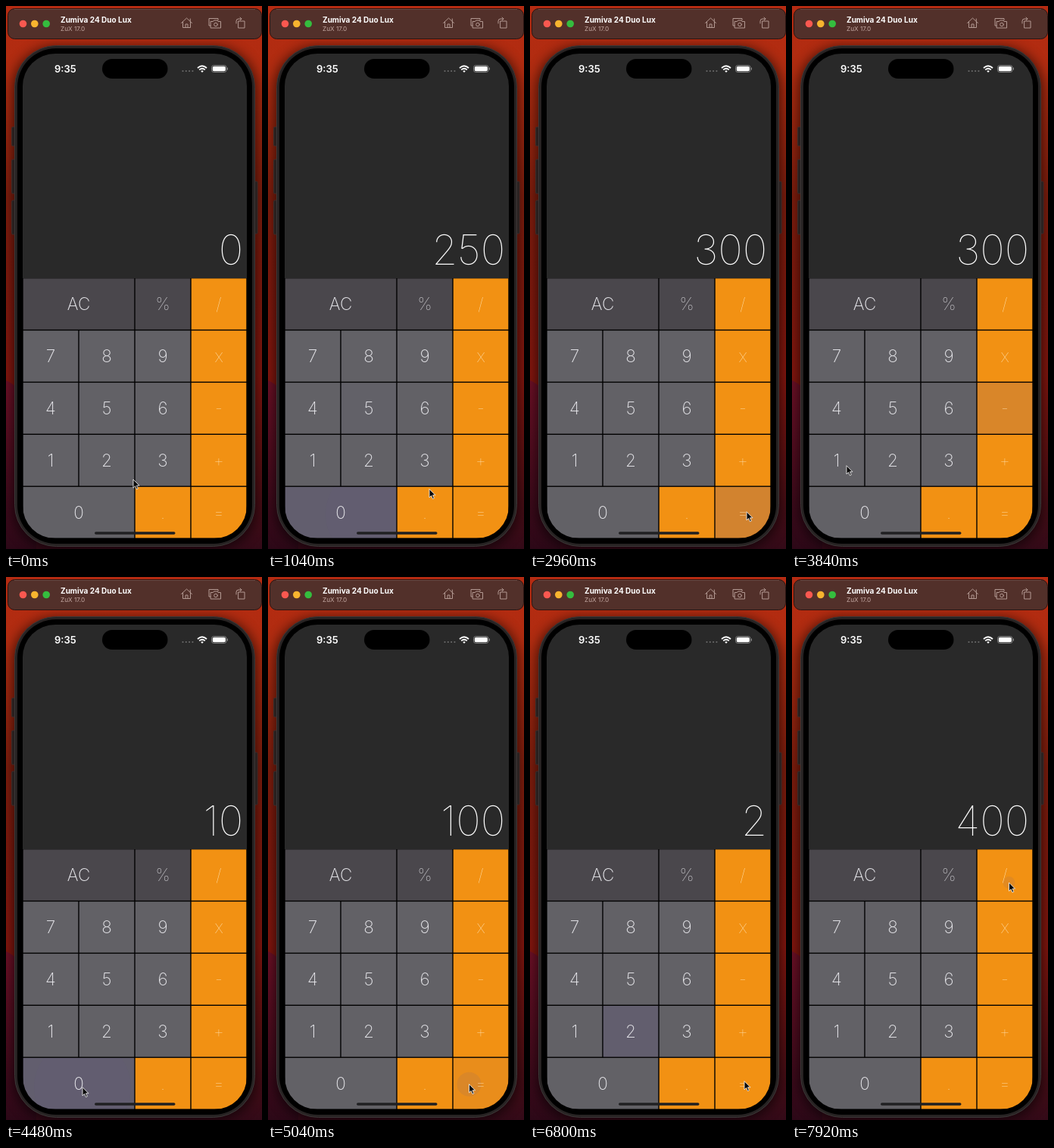
Write an HTML page that moves like this. It is 338 px wide and 718 px high and loops after 8000 ms.

```html
<!DOCTYPE html>
<html lang="en">
<head>
<meta charset="utf-8">
<title>Calculator</title>
<style>
  html, body { margin: 0; width: 100%; height: 100%; overflow: hidden; background: #5c140c; }
  svg { display: block; width: 100vw; height: 100vh; }
  text { font-family: Inter, Roboto, sans-serif; }
  .key { font-size: 22.5px; font-weight: 200; fill: #e6e6ea; text-anchor: middle; }
  .sign { font-weight: 100; }
  .orange { fill: #ffe0ae; }
  #display { font-size: 55px; font-weight: 100; fill: #fff; text-anchor: end; }
  .icon { fill: none; stroke: #b39992; stroke-width: 1; stroke-linejoin: round; stroke-linecap: round; }
</style>
</head>
<body>
<svg viewBox="0 0 338 718" preserveAspectRatio="none">
  <defs>
    <linearGradient id="wall" x2="0" y2="1">
      <stop offset="0" stop-color="#b52b12"/>
      <stop offset=".12" stop-color="#b02c10"/>
      <stop offset=".35" stop-color="#7e1d0d"/>
      <stop offset=".68" stop-color="#84160e"/>
      <stop offset="1" stop-color="#330a18"/>
    </linearGradient>
    <linearGradient id="hill" x2="0" y2="1">
      <stop offset="0" stop-color="#6d1026"/>
      <stop offset="1" stop-color="#2c0817"/>
    </linearGradient>
    <filter id="blur"><feGaussianBlur stdDeviation="8"/></filter>
    <clipPath id="screen"><rect x="22" y="63" width="296" height="641" rx="43"/></clipPath>
  </defs>

  <rect width="338" height="718" fill="url(#wall)"/>
  <path d="M0 495Q18 502 40 540V718H0Z" fill="url(#hill)"/>
  <rect x="9" y="54" width="322" height="664" rx="55" opacity=".6" filter="url(#blur)"/>

  <rect x="2.5" y="3.5" width="335" height="40" rx="9" fill="#52302a" stroke="#2b1512"/>
  <path d="M11 4.5H329" stroke="#775048" stroke-width=".8"/>
  <circle cx="22.5" cy="23.5" r="4.8" fill="#fb5850"/>
  <circle cx="37.8" cy="23.5" r="4.8" fill="#f8b42f"/>
  <circle cx="53.2" cy="23.5" r="4.8" fill="#35bd3e"/>
  <text x="72" y="22" font-size="10" font-weight="700" fill="#fff">Zumiva 24 Duo Lux</text>
  <text x="72" y="32.8" font-size="8.2" fill="#c5aaa4">ZuX 17.0</text>
  <g class="icon">
    <path d="M231.5 22.5L238.5 16L245.5 22.5M233.5 21V28.5H243.5V21M237 28.5V24H240V28.5M243.3 20V17"/>
    <path d="M270 26H268V16.5H280V18.5M270.5 20.5H273.5L274.5 19H279L280 20.5H283.5V29H270.5Z"/>
    <circle cx="277" cy="24.5" r="2.3"/>
    <path d="M307 20H315V29H307ZM304 23V20Q304 17 307 17H311M309 15L311 17L309 19"/>
  </g>

  <g fill="#29201f" stroke="#3a3230" stroke-width=".8">
    <rect x="7.5" y="160" width="6" height="25" rx="1.5"/>
    <rect x="7.5" y="203" width="6" height="45" rx="1.5"/>
    <rect x="7.5" y="257" width="6" height="45" rx="1.5"/>
    <rect x="326" y="232" width="6" height="69" rx="1.5"/>
  </g>
  <rect x="11.5" y="52.5" width="317" height="662" rx="55" fill="#272323" stroke="#3c3737"/>
  <rect x="15" y="56" width="310" height="655" rx="51" fill="#000"/>

  <g clip-path="url(#screen)">
    <rect x="22" y="63" width="296" height="297" fill="#292929"/>
    <g id="keys"></g>
  </g>

  <text x="64" y="87.5" font-size="13" font-weight="600" fill="#fff">9:35</text>
  <rect x="127" y="70" width="86.5" height="26" rx="13" fill="#000"/>
  <path d="M233.5 86H248" stroke="#6a6a6a" stroke-width="2.2" stroke-linecap="round" stroke-dasharray="0 4.3"/>
  <g fill="none" stroke="#fff" stroke-width="1.8">
    <path d="M253 82Q259 76.4 265 82M255.2 84.4Q259 81 262.8 84.4"/>
    <path d="M259 88L257.2 85.9Q259 84.6 260.8 85.9Z" fill="#fff" stroke="none"/>
  </g>
  <rect x="271.5" y="78.5" width="19.5" height="9" rx="2.8" fill="none" stroke="#8b8b8b" stroke-width=".9"/>
  <rect x="272.8" y="79.7" width="17" height="6.6" rx="1.7" fill="#fff"/>
  <path d="M292.3 81.5V84.5" stroke="#8b8b8b" stroke-width="1.2"/>
  <text id="display" x="313.2" y="342"></text>
  <rect x="117" y="695.2" width="106.5" height="3.6" rx="1.8" fill="#202022"/>
  <path id="cursor" d="M0 0V11.2L2.6 8.8L4.4 13L6.3 12.2L4.5 8.1H8Z" fill="#080808" stroke="#fff" stroke-width=".8"/>
</svg>
<script>
const LOOP = 8000, STEP = 80, DWELL = 80, RELEASE = 160, FADED = 400;
const CELL_W = 74, CELL_H = 68.9, BORDER = 0.7, TINT = "rgb(96,80,150)";
const rows = ["AC AC % /", "7 8 9 x", "4 5 6 -", "1 2 3 +", "0 0 . ="];

// time, key, optional tap offset from the key's centre
const presses = [
  [440, "2"], [660, "5"], [880, "0", 44, 2], [1200, "+"],
  [1840, "5"], [2160, "0", 19, -19], [2800, "="], [3600, "-"],
  [3920, "1", 13, 7], [4320, "0"], [4560, "0"], [4960, "=", -15.5, 1],
  [5760, "x"], [6560, "2"], [6880, "=", 2, -3], [7920, "/", 5.5, 10]
];

const $ = id => document.getElementById(id);
const clamp = v => Math.max(0, Math.min(1, v));
const smooth = u => u * u * (3 - 2 * u);
function add(parent, tag, attrs) {
  const el = document.createElementNS("http://www.w3.org/2000/svg", tag);
  for (const name in attrs) el.setAttribute(name, attrs[name]);
  return parent.appendChild(el);
}

const keys = {};
function addKey(label, r, c, span) {
  const left = 22 + c * CELL_W, top = 359.6 + r * CELL_H;
  const box = {
    x: left + BORDER, y: top + BORDER,
    width: span * CELL_W - 2 * BORDER, height: CELL_H - 2 * BORDER
  };
  const cx = left + span * CELL_W / 2, cy = top + CELL_H / 2;
  const orange = c === 3 || label === ".";
  const group = add($("keys"), "g", {});
  const clip = add(group, "clipPath", { id: `key${r}${c}` });
  add(clip, "rect", box);
  add(group, "rect", { ...box, fill: orange ? "#f29113" : r ? "#626166" : "#4a474c" });
  const glow = add(group, "rect", { ...box, fill: TINT });
  const splash = add(group, "circle", { fill: TINT, "clip-path": `url(#key${r}${c})` });
  const style = ["key", /\w/.test(label) && !orange ? "" : "sign", orange ? "orange" : ""].join(" ");
  add(group, "text", { class: style, x: cx, y: cy + 8 }).textContent = label;
  keys[label] = { cx, cy, glow, splash };
}
rows.forEach((row, r) => {
  const labels = row.split(" ");
  labels.forEach((label, c) => {
    if (labels[c - 1] !== label) addKey(label, r, c, labels[c + 1] === label ? 2 : 1);
  });
});

const operations = {
  "+": (a, b) => a + b, "-": (a, b) => a - b,
  "x": (a, b) => a * b, "/": (a, b) => a / b
};
function calculator() {
  let shown = "0", stored = 0, pending = null, fresh = true;
  return key => {
    if (/\d/.test(key)) {
      shown = fresh ? key : shown + key;
      fresh = false;
    } else {
      if (pending && !fresh) shown = String(operations[pending](stored, +shown));
      stored = +shown;
      pending = key === "=" ? null : key;
      fresh = true;
    }
    return shown;
  };
}

const enter = calculator();
const taps = presses.map(([time, label, dx = 5, dy = 5]) => {
  const key = keys[label];
  return { time, key, x: key.cx + dx, y: key.cy + dy, result: enter(label) };
});
const stops = [{ time: 240, x: 168, y: 626 }, ...taps];

// The pointer rests around each press and glides in between.
function pointerAt(t) {
  const i = stops.findIndex(stop => stop.time >= t);
  if (i === 0) return stops[0];
  if (i < 0) return stops[stops.length - 1];
  const a = stops[i - 1], b = stops[i];
  const e = smooth(clamp((t - a.time - DWELL) / (b.time - a.time - 2 * DWELL)));
  return { x: a.x + (b.x - a.x) * e, y: a.y + (b.y - a.y) * e };
}

function draw(t) {
  let shown = "0";
  for (const { glow, splash } of Object.values(keys)) {
    glow.setAttribute("opacity", 0);
    splash.setAttribute("opacity", 0);
  }
  for (const { time, key, x, y, result } of taps) {
    const age = t - time;
    if (age >= RELEASE) shown = result;
    if (age < 0 || age > FADED) continue;
    key.glow.setAttribute("opacity", 0.17 * clamp((age - 40) / 110) * clamp((FADED - age) / 140));
    key.splash.setAttribute("cx", x);
    key.splash.setAttribute("cy", y);
    key.splash.setAttribute("r", 8 + age * 0.1 + Math.max(0, age - 80) * 0.5);
    key.splash.setAttribute("opacity", 0.11 * clamp((240 - age) / 160));
  }
  const pointer = pointerAt(t);
  $("display").textContent = shown;
  $("cursor").setAttribute("transform", `translate(${pointer.x} ${pointer.y})`);
}

const began = performance.now();
function tick() {
  const t = (performance.now() - began) % LOOP;
  draw(Math.floor(t / STEP) * STEP);
  requestAnimationFrame(tick);
}
tick();
</script>
</body>
</html>
```
